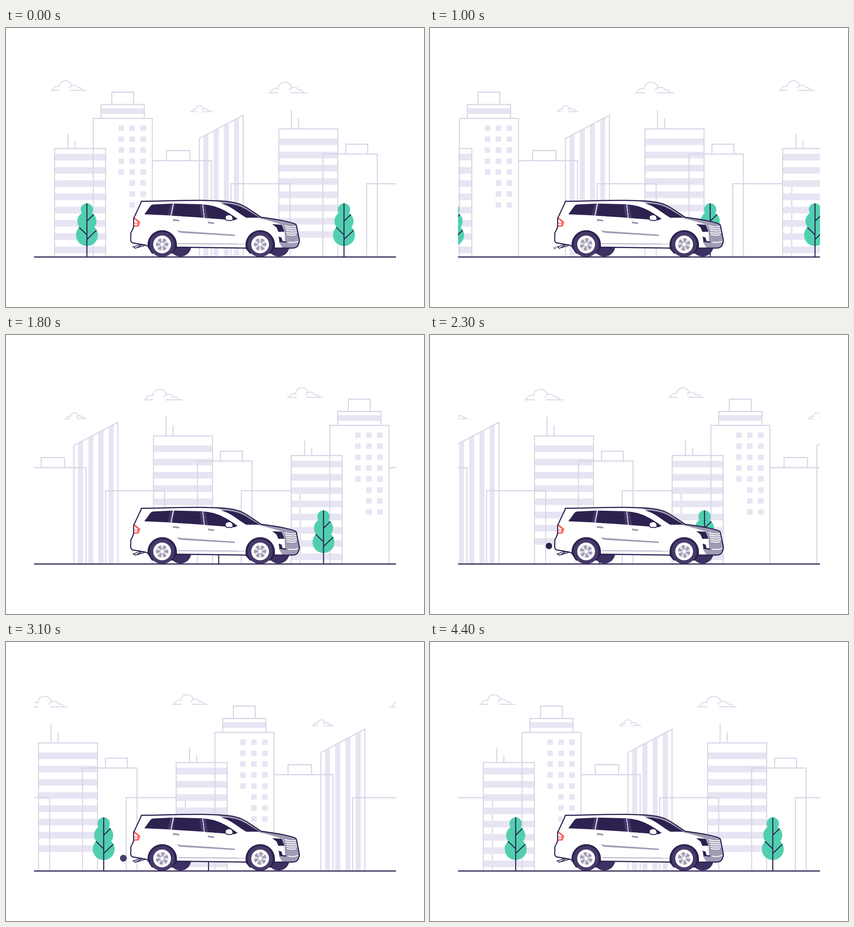
Write an HTML page that moves like this. It is 917 px wide and 611 px high and loops after 4500 ms.

```html
<!DOCTYPE html>
<html lang="en">
<head>
<meta charset="utf-8">
<title>Car in the city</title>
<style>
  html, body { margin: 0; width: 100%; height: 100%; overflow: hidden; background: #fff; }
  svg { display: block; width: 100%; height: 100%; }
  .line { fill: none; stroke: #d8d5e6; stroke-width: 2.3; }
  .thin { stroke-width: 1.8; stroke-linecap: round; }
  .pale { fill: #e7e5f3; }
  .dark { fill: #2d2150; }
  .mid { fill: #473a6b; }
  .far { fill: #3d3062; }
  .grey { fill: #a09bb4; }
  .white { fill: #fff; }
  .ink { fill: none; stroke: #2d2150; stroke-width: 2.4; stroke-linejoin: round; stroke-linecap: round; }
  .fine { stroke-width: 1.8; }
</style>
</head>
<body>
<svg viewBox="0 0 917 611">
  <defs>
    <clipPath id="view"><path d="M61.5 0H855.5V611H61.5Z"/></clipPath>

    <path id="cloud" vector-effect="non-scaling-stroke" d="M0 0H19.5M43.5 0H77.5M4.5 0C5 -7 12 -10.5 18.5 -8C19 -24.5 44 -26 46 -9M41 -5.5C44 -13.5 57 -13 59.5 -5.5C65 -6.5 69.5 -4 69.5 0"/>

    <g id="tree">
      <g fill="#50cfaf">
        <circle cy="397.5" r="13.5"/><circle cy="423" r="21"/><circle cy="453.5" r="24"/>
      </g>
      <path fill="none" stroke="#2d2150" stroke-width="2.3" d="M0 384V501M0 423L15 408.5M-17 436.5L0 453M0 463L21 443"/>
    </g>

    <g id="city">
      <g id="fills" class="pale"></g>
      <g class="line">
        <path d="M106.500 501V264H218.500V501M136 264V231.500M151.500 264V247.500"/>
        <path d="M191.500 501V198H321V501M208.500 198V167.500H303.500V198M232 167V140.500H280V167"/>
        <path d="M321 290.500H450.500V501M352 290V268.500H403.500V290"/>
        <path d="M424 501V242L520.500 191V501"/>
        <path d="M493.500 501V341H623V501M791 501V341H920.500V501"/>
        <path d="M598.500 501V221H728V501M626 221V179M641.500 221V198"/>
        <path d="M695 501V276H814.500V501M745.500 276V254.500H793.500V276"/>
      </g>
      <g class="line thin">
        <use href="#cloud" transform="translate(98 136.500)"/>
        <use href="#cloud" transform="translate(576.500 142) scale(1.1)"/>
        <use href="#cloud" transform="translate(405 183.300) scale(.61)"/>
      </g>
      <use href="#tree" x="177.500"/>
      <use href="#tree" x="741.500"/>
    </g>

    <path id="body" d="M297 379.500C340 379.500 380 377 430 377.500C475 378.500 498 379 518 388C535 396 548 408 560 414.500C590 419 616 422 634 429Q637 430.500 637.500 434L643.500 464Q644 470 640 477Q637 482 628 482L525 482L376 480L312 478L306 475.500L277 470.500Q273.500 468 273.500 463L274 448L277 443L280 435V417L295.500 384Z"/>

    <g id="wheel">
      <circle class="mid" r="27.500"/>
      <circle class="white" r="19.500"/>
      <g class="spin"></g>
    </g>
  </defs>

  <g clip-path="url(#view)">
    <g id="scene"><use href="#city"/><use href="#city" x="794"/></g>
  </g>

  <circle id="puff"/>

  <g id="car">
    <circle class="far" cx="382.500" cy="476.500" r="24"/>
    <circle class="far" cx="598" cy="476.500" r="24"/>
    <path class="ink fine" d="M299 473L281.500 478.500L283 482.500L304 476.500M286 481.500L298 475M278.500 479.500H282"/>

    <use href="#body" class="white"/>
    <path class="grey" d="M458 379C488 379 506 382 519 388C535 396 548 408 560 414.500C590 419 616 422 634 429Q637 430.500 637.500 434L643.500 464Q644 470 640 477Q637 482 628 482H607L598 468L612 467L611 446L606 431C590 425 566 419 552 416L527 415C510 403 488 384 458 379Z"/>
    <path class="dark" d="M471 384.500C492 384 504 387 516 392C531 399 543 408 556 415L527 415.500C508 405 492 388 471 384.500Z"/>

    <path class="dark" d="M303.500 408L317 389.500Q319 387 323 386.500L366 384.500L361 410.500ZM368.500 384.500L430.500 386L434 415.500L363 411ZM432.500 386.500C462 388 483 400 508 418L501 421L436 416Z"/>
    <path class="mid" d="M361 385.500L366 385L361 410.500L355 410ZM368.500 385L371 385L366 411L363 411ZM424 387L430.500 387L434 415.500L429 415ZM432.500 387L438 388L443 416.500L436 416Z"/>
    <path class="ink fine" style="fill:#fff" d="M482 411.500Q488 407.500 494 410Q498 413 498 419L495 421.500H485Q479 419 482 411.500Z"/>
    <path d="M367.500 420.500L378.500 421.700M444.500 426L455 427.300" stroke="#a09bb4" stroke-width="3.800" stroke-linecap="round"/>
    <path class="grey" d="M375 442.500L382 444.500L503 452.500L501.500 455.500L383 448.500Q378 447.500 375 442.500Z"/>
    <path d="M377 472.300L523 473.300" stroke="#a09bb4" stroke-width="1.500"/>

    <path fill="#ff5f5c" d="M282 414.500L294.500 424.500L291.500 434.500L280 435.500V432.500L288 431.500L289.500 425.500L281 418Z"/>
    <path fill="none" stroke="#ff5f5c" stroke-width="1.600" d="M281 427.500H290"/>

    <path class="dark" d="M584 429.500L605 431L611 446L597.500 446.500L593.500 437ZM598 457L604.500 459L606.500 466.500L615 467.500L614 470L600 468.500Z"/>
    <path fill="none" stroke="#fff" stroke-width="2" d="M611 432.500Q624 437 637 434.500M612.500 437.500Q625 441.500 638 439M614 442.500Q626 446 639 443.500M615 447.500Q627 450.500 639 448M616 452Q627 455 636 452.500M619 469Q630 471 641 467.500"/>
    <use href="#body" class="ink"/>

    <path class="dark" d="M310.500 479V473A32.300 32 0 0 1 375 473V481L365 494H320ZM525.500 483V473A32.300 32 0 0 1 590 473V480L582 494H535Z"/>
    <use href="#wheel" x="342.500" y="474"/>
    <use href="#wheel" x="557.500" y="474"/>
  </g>

  <path d="M61.500 501.500H855.500" stroke="#2d2150" stroke-width="2.500"/>
</svg>

<script>
const $ = id => document.getElementById(id);
const LOOP = 4500, STEP = 100, PERIOD = 794;

// Stripes and windows of the skyline
let fills = '';
const box = (x, y, w, h) => fills += `<path d="M${x} ${y}h${w}v${h}h${-w}z"/>`;
for (let i = 0; i < 8; i++) {
  box(106.5, 275.5 + 29 * i, 112, 14.5);
  box(598.5, 242 + 29 * i, 129.5, 14.5);
  for (let col = i < 5 ? 0 : 1; col < 3; col++) box(247 + 24 * col, 213.5 + 24 * i, 12, 12);
}
box(208.5, 175.5, 95, 12.5);
const slope = x => 242 - (x - 424) * 51 / 96.5;
for (let i = 0; i < 4; i++) {
  const x = 433 + 22.4 * i;
  fills += `<path d="M${x} 501V${slope(x)}L${x + 11} ${slope(x + 11)}V501Z"/>`;
}
$('fills').innerHTML = fills;

// Six spoke gaps with fine lines between them
const spin = document.querySelector('.spin');
for (let a = 0; a < 360; a += 60) {
  spin.innerHTML += `<g transform="rotate(${a})"><path class="grey" d="M4 -1L13 -4.5Q14.5 0 13 4.5L4 1Z"/>
    <path d="M3 0H13" transform="rotate(30)" stroke="#a09bb4" stroke-width=".8"/></g>`;
}

// Scroll keys: step, distance, speed per step
const scroll = [[0, 0, 4], [6, 59.3, 15], [14, 201.2, 18.4], [23, 369.3, 19.3],
  [31, 527.2, 20.1], [37, 648, 20.2], [44, 783.5, 15], [45, PERIOD, 6]];

function distance(n) {
  const i = scroll.findIndex(k => k[0] > n);
  const [n0, d0, v0] = scroll[i - 1], [n1, d1, v1] = scroll[i];
  const h = n1 - n0, u = (n - n0) / h, w = 1 - u;
  return w * w * (1 + 2 * u) * d0 + u * u * (3 - 2 * u) * d1 + h * u * w * (w * v0 - u * v1);
}

// Exhaust puff per step: x, y, radius, colour
const puffs = [null, [274, 482, 3, '#a09bb4'], [268, 479, 4.5, '#837c9d'], [262, 476, 6, '#675c87'],
  [257.5, 473.5, 7.5, '#4a3d70'], [261, 462, 7, '#2d2150'], [247.8, 454, 5, '#a09bb4'],
  [243, 450, 2.5, '#a09bb4'], null];

function draw(now) {
  const n = Math.floor(now % LOOP / STEP), phase = n % puffs.length;
  $('scene').setAttribute('transform', `translate(${-distance(n)})`);
  spin.setAttribute('transform', `rotate(${phase * 40})`);
  const [x, y, r, color] = puffs[phase] || [0, 0, 0, 'none'];
  for (const [key, value] of Object.entries({ cx: x, cy: y, r, fill: color })) $('puff').setAttribute(key, value);
}

const start = performance.now();
function tick() {
  draw(performance.now() - start);
  requestAnimationFrame(tick);
}
tick();
</script>
</body>
</html>
```
